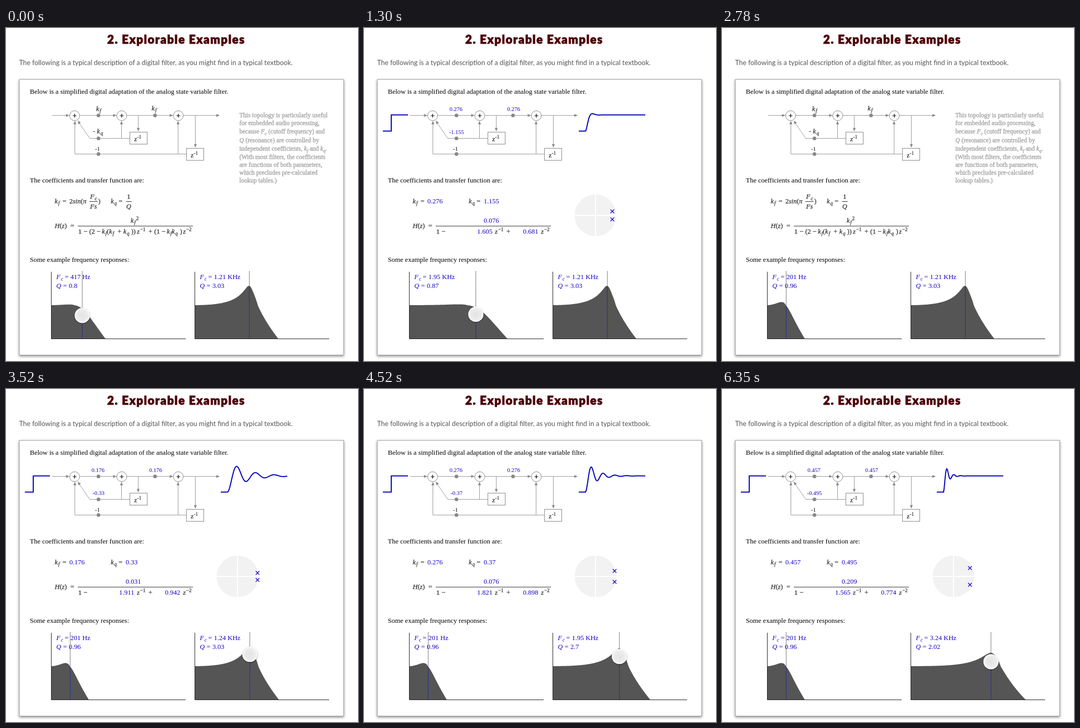
These frames come from a looping animation (672x638 px, 6400 ms). An HTML page:

```html
<!DOCTYPE html>
<html lang="en">
<head>
<meta charset="utf-8">
<title>Explorable Examples</title>
<style>
  html, body { margin: 0; width: 100%; height: 100%; overflow: hidden; background: #fff; }
  svg { position: absolute; left: 0; top: 0; }
  .card {
    position: absolute; left: 25px; top: 98px; width: 618px; height: 527px;
    border: 1px solid #a4a4a4; background: #fff; box-shadow: 0 2px 5px rgba(0, 0, 0, .47);
  }
  text { font: 13px "Liberation Serif", "Times New Roman", serif; fill: #000; white-space: pre; }
  .title {
    font: 900 22px Lato, "Open Sans", sans-serif; letter-spacing: 1.58px;
    fill: #4d0006; stroke: #4d0006; stroke-width: .9;
  }
  .intro { font: 12.94px Lato, "Open Sans", sans-serif; fill: #555; }
  .side text { font-size: 12px; fill: #a2a2a2; stroke: #a2a2a2; stroke-width: .35; }
  .math { fill: #333; stroke: #333; stroke-width: .25; }
  .small { font-size: 11px; }
  .mid { text-anchor: middle; }
  text.blue { fill: #1400c8; }
  .wire { fill: none; stroke: #999; }
  .head, .dot { fill: #888; }
  .node { fill: #fff; stroke: #888; }
  .bar { stroke: #333; }
  .signal { fill: none; stroke: #0000be; stroke-width: 2; }
  .pole { fill: none; stroke: #1400c8; stroke-width: 1.3; }
  .fill { fill: #555; }
  .axis { fill: none; stroke: #222; }
  .dots { stroke-dasharray: 1 1; }
</style>
</head>
<body>
<div class="card"></div>
<svg id="stage" width="672" height="638" viewBox="0 0 672 638">
  <defs>
    <radialGradient id="shine">
      <stop offset="0" stop-color="#e4e4e4"/><stop offset=".7" stop-color="#ebebeb"/>
      <stop offset="1" stop-color="#fafafa"/>
    </radialGradient>
    <filter id="drop" x="-40%" y="-40%" width="180%" height="180%">
      <feDropShadow dx="0" dy="1" stdDeviation="1.3" flood-opacity=".55"/>
    </filter>
  </defs>
  <text class="title mid" x="325" y="30">2. Explorable Examples</text>
  <text class="intro" x="25" y="71">The following is a typical description of a digital filter, as you might find in a typical textbook.</text>
  <text x="45.5" y="126">Below is a simplified digital adaptation of the analog state variable filter.</text>
  <text x="45.5" y="296">The coefficients and transfer function are:</text>
  <text x="45.5" y="448">Some example frequency responses:</text>
  <g id="diagram"></g>
  <g id="fixed"></g>
  <g id="symbolic"></g>
  <g id="numeric"></g>
  <g id="charts"></g>
</svg>
<script>
const $ = id => document.getElementById(id);
const LOOP = 6400, FPS = 23, STEPS = 147, RATE = 44100, SPAN = 256;
const PRESS = 40, RELEASE = 2420, LEAVE = 2560, ENTER = 3050, GRAB = 3350;
const LOW = 197.5, HIGH = 166.5;

// Mini notation: letters are italic, _x is a subscript, ^n a superscript.
function rich(src) {
  let shift = 0, out = '';
  for (const [tok, sub, sup] of src.matchAll(/_(\w)|\^([−\d]+)|[^]/g)) {
    const level = sub ? 3 : sup ? -5 : 0;
    const body = sub || sup || tok;
    const italic = /^[A-Za-zπ]$/.test(body) ? ' font-style="italic"' : '';
    const script = sub || sup ? ' dx="1" font-size="9.5"' : '';
    out += `<tspan dy="${level - shift}"${italic}${script}>${body}</tspan>`;
    shift = level;
  }
  return out;
}
const text = (x, y, s, cls = '') => `<text class="${cls}" x="${x}" y="${y}">${s}</text>`;
const math = (x, y, s) => text(x, y, rich(s), 'math');
const bar = (x1, x2, y) => `<path class="bar" d="M${x1} ${y}H${x2}"/>`;

function buildDiagram() {
  const wires = 'M88 167.5H121M141 167.5H211M231 167.5H319M339 167.5H405M252.5 167V197' +
    'M236 211.5H160L139 181M220.5 211V181M361.5 167V227M344 241.5H131.5V181M328.5 241V181';
  const heads = [[121, 167.5, 0], [211, 167.5, 0], [319, 167.5, 0], [408, 167.5, 0],
    [252.5, 198, 90], [361.5, 229, 90], [220.5, 178, -90], [328.5, 178, -90],
    [131.5, 178, -90], [137, 177.5, -124]];
  let s = `<path class="wire" d="${wires}"/>`;
  for (const [x, y, a] of heads)
    s += `<path class="head" d="M0 0L-6.5 -2.8V2.8Z" transform="translate(${x} ${y}) rotate(${a})"/>`;
  for (const [x, y] of [[176.5, 167.5], [284.5, 167.5], [176.5, 211.5], [176.5, 241.5]])
    s += `<circle class="dot" cx="${x}" cy="${y}" r="3.5"/>`;
  for (const x of [131, 221, 329])
    s += `<circle class="node" cx="${x}" cy="168" r="9.5"/>` +
      `<path stroke="#000" stroke-width="1.2" d="M${x - 3.5} 168H${x + 3.5}M${x} 164.5V171.5"/>`;
  for (const [x, y] of [[236.5, 199.5], [344.5, 230.5]])
    s += `<rect class="node" x="${x}" y="${y}" width="33" height="23"/>` +
      text(x + 8, y + 17, 'z<tspan dy="-5" font-size="10">-1</tspan>');
  $('diagram').innerHTML = s + text(170, 235, '-1', 'small');
}

function buildFormulas() {
  $('fixed').innerHTML =
    math(93, 336, 'k_f') + math(108, 336, '=') + math(200, 336, 'k_q') + math(215, 336, '=') +
    math(93, 383, 'H(z)') + math(123, 383, '=') + bar(137, 357, 379.5) +
    math(138, 394, '1') + math(148, 394, '−') + math(250, 394, 'z^−1') +
    math(272, 394, '+') + math(338, 394, 'z^−2');

  const lines = ['This topology is particularly useful', 'for embedded audio processing,',
    'because <tspan font-style="italic">F<tspan dy="3" font-size="9">c</tspan></tspan><tspan dy="-3"> (cutoff frequency) and</tspan>',
    '<tspan font-style="italic">Q</tspan> (resonance) are controlled by',
    'independent coefficients, <tspan font-style="italic">k<tspan dy="3" font-size="9">f</tspan></tspan><tspan dy="-3"> and </tspan><tspan font-style="italic">k<tspan dy="3" font-size="9">q</tspan></tspan><tspan dy="-3">.</tspan>',
    '(With most filters, the coefficients', 'are functions of both parameters,',
    'which precludes pre-calculated', 'lookup tables.)'];
  const rows = [171, 186, 202, 219, 235, 251, 266, 281, 296];
  $('symbolic').innerHTML =
    `<g class="side">${lines.map((l, i) => text(445.5, rows[i], l)).join('')}</g>` +
    math(172, 159, 'k_f') + math(278, 158, 'k_f') + math(166, 202, '- k_q') +
    math(121, 336, '2sin(π') + math(160.5, 327, 'F_c') + bar(159, 175, 332.5) +
    math(160.5, 346, 'Fs') + math(176, 336, ')') +
    math(231, 327, '1') + bar(229, 240, 332.5) + math(229.5, 346, 'Q') +
    math(238, 373, 'k_f^2') +
    math(159, 394, '(2') + math(173, 394, '−') + math(183, 394, 'k_f(k_f') +
    math(213, 394, '+') + math(224, 394, 'k_q') + math(239, 394, '))') +
    math(283, 394, '(1') + math(297, 394, '−') + math(307, 394, 'k_fk_q') + math(332, 394, ')');

  const slot = (id, x, y, cls = '') => `<text id="${id}" class="blue ${cls}" x="${x}" y="${y}"></text>`;
  $('numeric').innerHTML =
    `<path class="signal" d="M36 ${LOW}H52V${HIGH}H84"/><path class="signal" id="step"/>` +
    '<circle cx="442" cy="359" r="40" fill="#f2f2f2"/>' +
    '<path stroke="#fff" stroke-width="2" d="M402 359H482M442 319V399"/><path class="pole" id="poles"/>' +
    slot('gain1', 175.5, 159, 'small mid') + slot('gain2', 285.5, 159, 'small mid') +
    slot('damp', 176.5, 203, 'small mid') + slot('kf', 121, 336) + slot('kq', 228.5, 336) +
    slot('num', 243, 373, 'mid') + slot('a1', 216, 394) + slot('a2', 303.5, 394);
}

function makeChart(left) {
  const g = document.createElementNS('http://www.w3.org/2000/svg', 'g');
  const clip = 'under' + left;
  g.innerHTML = `<clipPath id="${clip}"><path/></clipPath><path class="fill"/>` +
    `<path class="dots" stroke="#000"/><path class="dots" stroke="#0000d0" clip-path="url(#${clip})"/>` +
    `<path class="axis" d="M${left - .5} 467V595.5H${left + SPAN}"/>` +
    text(left + 9, 481, rich('F_c'), 'blue') + text(left + 25, 481, '=', 'blue') +
    text(left + 36, 481, '', 'blue') +
    text(left + 9, 498, rich('Q'), 'blue') + text(left + 22, 498, '=', 'blue') +
    text(left + 33, 498, '', 'blue') +
    '<circle r="14.5" fill="url(#shine)" filter="url(#drop)"/>';
  $('charts').append(g);
  const [under, area, upper, lower] = g.querySelectorAll('path');
  const labels = g.querySelectorAll('text');
  return { left, under, area, upper, lower, freq: labels[2], res: labels[5], ball: g.querySelector('circle') };
}

const hertz = px => RATE / 2 * (100 ** (px / SPAN) - 1) / 99;
const short = (v, digits) => String(+v.toFixed(digits));

function filter(px, q) {
  const kf = 2 * Math.sin(Math.PI * hertz(px) / RATE), kq = 1 / q;
  return { kf, kq, num: kf * kf, a1: 2 - kf * (kf + kq), a2: 1 - kf * kq };
}

function level(f, px) {
  const w = 2 * Math.PI * hertz(px) / RATE;
  const re = 1 - f.a1 * Math.cos(w) + f.a2 * Math.cos(2 * w);
  const im = f.a1 * Math.sin(w) - f.a2 * Math.sin(2 * w);
  const db = px > 0 ? 20 * Math.log10(f.num / Math.hypot(re, im)) : 0;
  return Math.min(595, 531 - (db > 0 ? 5.9 * db ** .81 : 3.62 * db));
}

function drawChart(c, px, q, held) {
  const f = filter(px, q), x = c.left + px;
  let d = `M${c.left} 595`;
  for (let i = 0; i <= SPAN; i++) d += `L${c.left + i} ${level(f, i).toFixed(2)}`;
  for (const p of [c.under, c.area]) p.setAttribute('d', d + 'V595Z');
  for (const p of [c.upper, c.lower]) p.setAttribute('d', `M${Math.floor(x) + .5} 466V595`);
  const hz = hertz(px);
  c.freq.textContent = hz < 1000 ? Math.round(hz) + ' Hz' : (hz / 1000).toFixed(2) + ' KHz';
  c.res.textContent = short(q, 2);
  c.ball.setAttribute('cx', x);
  c.ball.setAttribute('cy', 595.5 - 40 * Math.log(1 + q / .388));
  c.ball.style.display = held ? '' : 'none';
}

function drawNumbers(px, q) {
  const f = filter(px, q);
  const values = { gain1: f.kf, gain2: f.kf, damp: -f.kq, kf: f.kf, kq: f.kq, num: f.num, a1: f.a1, a2: f.a2 };
  for (const id in values) $(id).textContent = short(values[id], 3);

  let y1 = 0, y2 = 0, d = `M410 ${LOW}`;
  for (let n = 0; n < 128; n++) {
    const y = (n >= 14 ? f.num : 0) + f.a1 * y1 - f.a2 * y2;
    [y1, y2] = [y, y1];
    d += `L${410 + n} ${(LOW + (HIGH - LOW) * y).toFixed(2)}`;
  }
  $('step').setAttribute('d', d);

  const disc = f.a1 * f.a1 / 4 - f.a2, root = Math.sqrt(Math.abs(disc));
  $('poles').setAttribute('d', [1, -1].map(s => {
    const x = 442 + 40 * (f.a1 / 2 + (disc > 0 ? s * root : 0));
    const y = 359 + (disc > 0 ? 0 : 40 * s * root);
    return `M${x - 3.5} ${y - 3.5}l7 7m0 -7l-7 7`;
  }).join(''));
}

// Monotone cubic through [time, value] keys.
function track(keys) {
  const slope = keys.slice(1).map((k, i) => (k[1] - keys[i][1]) / (k[0] - keys[i][0]));
  const tangent = keys.map((k, i) => {
    const a = slope[i - 1], b = slope[i];
    return a * b > 0 ? 2 * a * b / (a + b) : 0;
  });
  return t => {
    if (t <= keys[0][0]) return keys[0][1];
    const i = keys.findIndex(k => k[0] >= t) - 1;
    if (i < 0) return keys[keys.length - 1][1];
    const h = keys[i + 1][0] - keys[i][0], u = (t - keys[i][0]) / h, v = 1 - u;
    return v * v * (1 + 2 * u) * keys[i][1] + u * u * (3 - 2 * u) * keys[i + 1][1] +
      h * u * v * (v * tangent[i] - u * tangent[i + 1]);
  };
}

const leftX = track([[PRESS, 58.66], [900, 146], [1300, 126.5], [2040, 39.68], [2250, 35.75]]);
const leftQ = track([[PRESS, .8], [1300, .8658], [2040, .9643], [2200, .9643]]);
const rightX = track([[3400, 103.5], [3520, 104.5], [3910, 155], [4200, 190], [4520, 126.5],
  [4570, 117], [4900, 83], [5220, 67], [5480, 75.6], [5870, 114], [6350, 152.5]]);
const rightQ = track([[3520, 3.0303], [4520, 2.7027], [5480, 2.342], [6350, 2.0202]]);

// The motion runs at a fixed rate, its steps rounded to 10 ms.
function stepTime(now) {
  const step = Math.min(STEPS - 1, Math.floor((now % LOOP + 5) * FPS / 1000));
  return Math.round(step * 100 / FPS) * 10;
}

buildDiagram();
buildFormulas();
const first = makeChart(87), second = makeChart(361);

function render() {
  const t = stepTime(performance.now());
  const onLeft = t < LEAVE;
  const dragging = (t >= PRESS && t < RELEASE) || t >= GRAB;
  drawChart(first, leftX(t), leftQ(t), onLeft);
  drawChart(second, rightX(t), rightQ(t), t >= ENTER);
  if (onLeft) drawNumbers(leftX(t), leftQ(t));
  else drawNumbers(rightX(t), rightQ(t));
  $('symbolic').style.display = dragging ? 'none' : '';
  $('numeric').style.display = dragging ? '' : 'none';
  requestAnimationFrame(render);
}
render();
</script>
</body>
</html>
```
